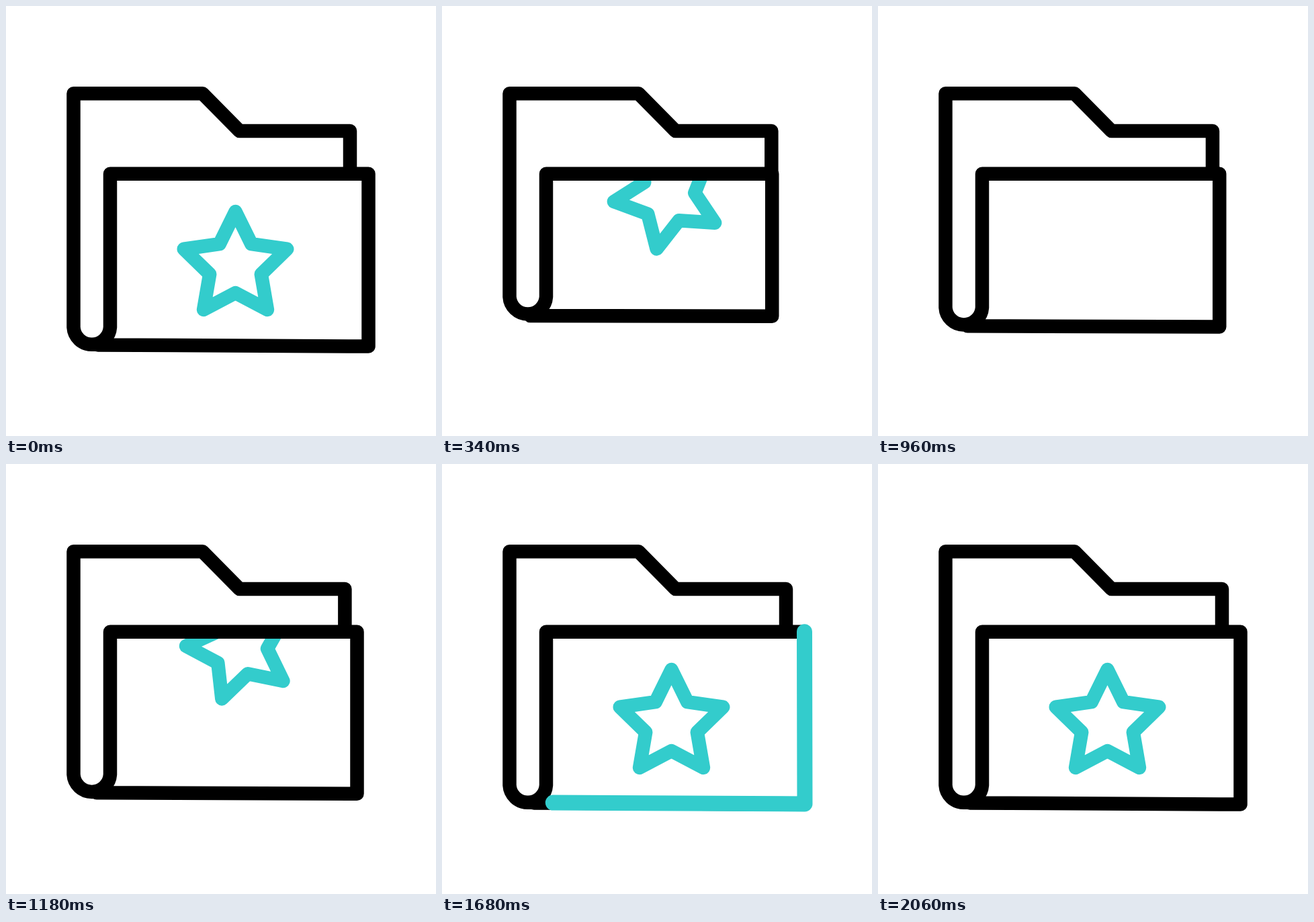
Recreate the animation shown at these times as an HTML page. Size 640 by 640 pixels, loop 2.12 s.

```html
<!DOCTYPE html>
<html>
<head>
<meta charset="utf-8">
<style>
  html, body { margin: 0; height: 100%; overflow: hidden; background: #fff; }
  svg { display: block; width: 100vw; height: 100vh; fill: none; stroke-linecap: round; stroke-linejoin: round; }
  .teal { stroke: #33cccc; stroke-width: 20.5; }
  #folder { stroke: #000; stroke-width: 20.5; }
  #trace { stroke-width: 23; }
</style>
</head>
<body>
<svg viewBox="0 0 640 640">
  <clipPath id="pocket"><path d="M0 250H640V640H0Z"/></clipPath>
  <g clip-path="url(#pocket)"><path id="star" class="teal"/></g>
  <path class="teal ray" pathLength="100" d="M384 158L354 99"/>
  <path class="teal ray" pathLength="100" d="M422 158L422.6 89"/>
  <path class="teal ray" pathLength="100" d="M460 158L483 98"/>
  <path id="folder"/>
  <path id="trace" class="teal" pathLength="100" d="M539.5 249.7L540 506L155 504V249.7Z"/>
</svg>
<script>
const LOOP = 2120, STEP = 20, DROP = 216;
const $ = id => document.getElementById(id);
const rays = document.querySelectorAll('.ray');
const ramp = (t, from, to) => Math.min(1, Math.max(0, (t - from) / (to - from)));

const points = Array.from({ length: 10 }, (_, i) => {
  const r = i % 2 ? 40.3 : 80.7, a = (i * 36 - 90) * Math.PI / 180;
  return [341.5 + r * Math.cos(a), 386.7 + r * Math.sin(a)];
});
$('star').setAttribute('d', 'M' + points.join('L') + 'Z');

// size: 0 is the compact folder, 1 the full one
function drawFolder(size) {
  const mix = (a, b) => a + (b - a) * size;
  const right = mix(490.5, 539.5), back = mix(490, 512), curl = mix(432.2, 478.2);
  $('folder').setAttribute('d',
    `M${back} 249.7V186H347.5L292.5 130.3H100.5V${curl}a27.3 27.3 0 0 0 54.5 0V249.7` +
    `H${right}V${mix(461, 506.6)}L${mix(131, 137)} ${mix(460.3, 504.5)}`);
}

function trim(path, start, end) {
  path.style.visibility = end > start ? 'visible' : 'hidden';
  path.setAttribute('stroke-dasharray', `${(end - start) * 100} 200`);
  path.setAttribute('stroke-dashoffset', -start * 100);
}

function drawStar(t) {
  const lift = t < 750
    ? DROP * ramp(t, 20, 486) ** 2
    : DROP * (1 - ramp(t, 1010, 1461)) ** 1.5;
  const turn = t < 750 ? lift * 0.47 : -lift * 0.83;
  $('star').style.visibility = lift < DROP ? 'visible' : 'hidden';
  $('star').setAttribute('transform', `translate(0 ${-lift}) rotate(${turn} 341.5 379.5)`);
}

function draw(now) {
  const time = now % LOOP;
  const t = time < 40 ? 0 : Math.floor(time / STEP) * STEP;
  drawFolder(t < 500 ? 1 - ramp(t, 20, 345) : ramp(t, 687, 1442));
  drawStar(t);
  rays.forEach(ray => trim(ray, ramp(t, 690, 860), ramp(t, 510, 683)));
  trim($('trace'), ramp(t, 1750, 2055), ramp(t, 1540, 1824));
}

const begin = performance.now();
function loop() {
  draw(performance.now() - begin);
  requestAnimationFrame(loop);
}
loop();
</script>
</body>
</html>
```
